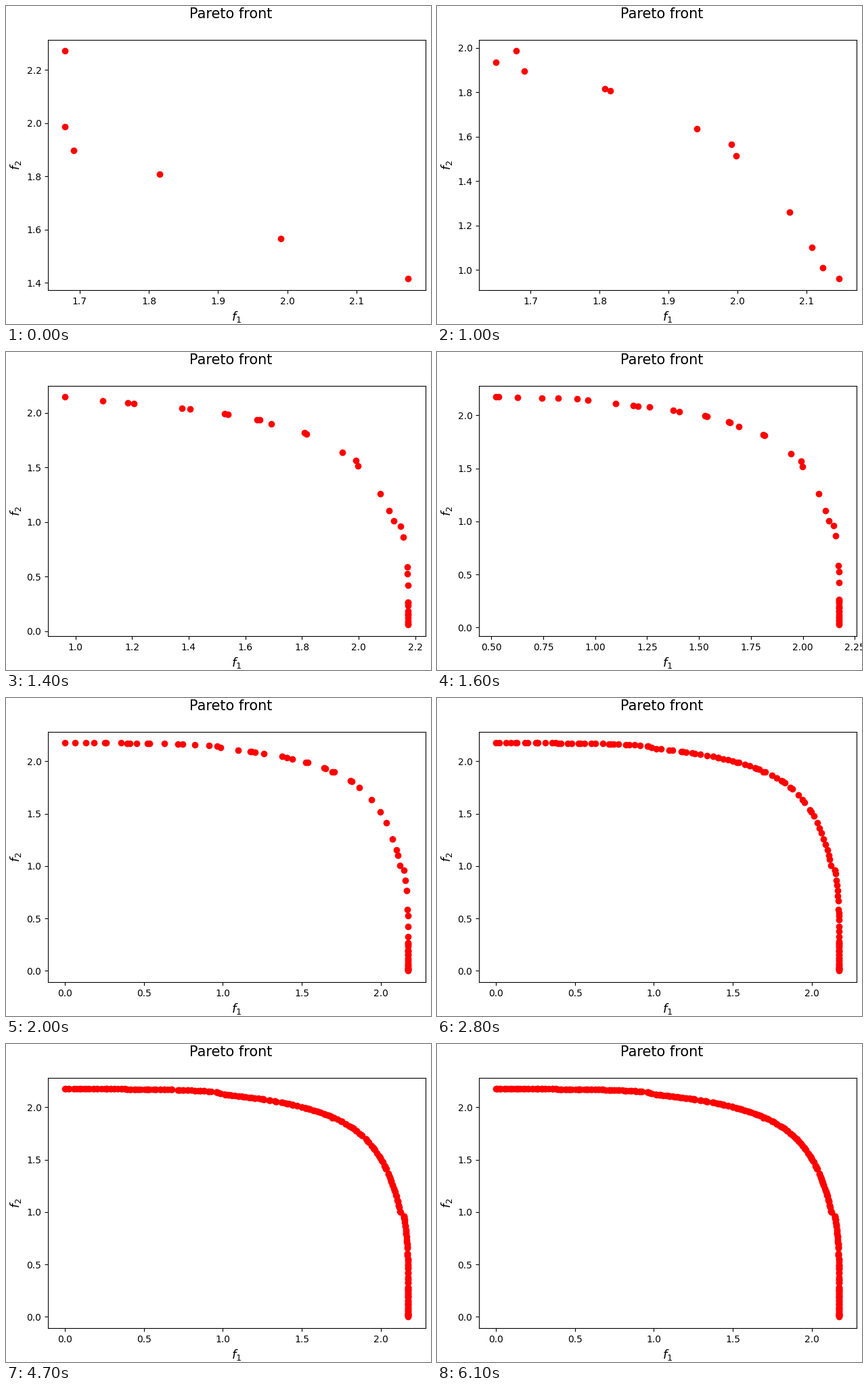
Recreate the animation shown at these times as a matplotlib script. Size 628x469 px, loop 6500 ms.

```python
import numpy as np
import matplotlib.pyplot as plt
from matplotlib.animation import FuncAnimation

W, H, DPI = 628, 469, 100
FRAMES, STEP = 65, 100
R = 2.1755
GOLDEN = (5 ** .5 - 1) / 2
rng = np.random.default_rng(4)

# Frames at which the archive of solutions grows, ever more rarely
CHANGES = [*range(10, 23), 24, 25, 27, 28, 30, 32, 34, 35, 38, 40, 44, 47,
           50, 53, 57, 61]


def front():
    """Symmetric superellipse whose exponent jumps near both ends."""
    t = np.pi / 4 * (1 - np.cos(np.pi * np.linspace(0, 1, 4001)))
    bend = np.sin(2 * t) ** 2
    keep = (bend < .178) | (bend > .279)
    t, bend = t[keep], bend[keep]
    power = np.where(bend < .23, 3.75, 3.15 + .64 * bend)
    return R * np.cos(t) ** (2 / power), R * np.sin(t) ** (2 / power)


CX, CY = front()
arc = np.r_[0, np.cumsum(np.hypot(np.diff(CX) * 1.5, np.diff(CY)))]
arc /= arc[-1]


def at_arc(u):
    return np.interp(u, arc, CX), np.interp(u, arc, CY)


def at_x(x):
    return x, np.interp(x, CX[::-1], CY[::-1])


def at_y(y):
    return np.interp(y, CY, CX), y


def reach(frame):
    """Smallest f1 and f2 found so far."""
    return (np.interp(frame, [10, 12, 16, 20], [1.65, 1.405, .523, 0]),
            np.interp(frame, [10, 12, 16, 20], [.96, .09, .026, 0]))


def goal(frame):
    return int(np.interp(frame, [10, 16, 20, 28, 47, 61],
                         [6, 20, 38, 90, 230, 290]))


# x, y, birth, death
points = [
    (1.679, 2.271, 0, 10),
    (1.679, 1.986, 0, 13),
    (1.691, 1.897, 0, FRAMES),
    (1.816, 1.808, 0, FRAMES),
    (1.991, 1.566, 0, 18),
    (2.175, 1.415, 0, 10),
]

# Both ends push outwards, with a cluster at the steep end
for f in range(10, 21):
    x_min, y_min = reach(f)
    points += [(*at_x(x_min), f, FRAMES), (*at_y(y_min), f, FRAMES)]
for k in range(10):
    points.append((*at_y(rng.uniform(.09, .27)), 12 + k % 5, FRAMES))

# The rest fills in evenly along the curve
order = np.arange(goal(FRAMES))
fx, fy = at_arc((order * GOLDEN + rng.uniform(-.004, .004, order.size)) % 1)
birth = np.full(order.size, FRAMES)
for f in CHANGES:
    x_min, y_min = reach(f)
    ready = np.flatnonzero((birth == FRAMES) & (fx >= x_min) & (fy >= y_min))
    missing = goal(f) - np.count_nonzero(birth < FRAMES)
    birth[ready[:missing]] = f
points += [(x, y, b, FRAMES) for x, y, b in zip(fx, fy, birth)]

X, Y, BORN, DIES = np.array(points).T

fig = plt.figure(figsize=(W / DPI, H / DPI), dpi=DPI)
left, right, top, bottom = 62.1, 619.8, 49.56, 419.2
ax = fig.add_axes([left / W, 1 - bottom / H, (right - left) / W, (bottom - top) / H])
fig.text(332 / W, 1 - 18 / H, "Pareto front", fontsize=15, ha="center", va="baseline")
ax.set_xlabel("$f_1$", fontsize=13)
ax.set_ylabel("$f_2$", fontsize=13)
dots, = ax.plot([], [], "ro")


def draw(i):
    live = (BORN <= i) & (i < DIES)
    dots.set_data(X[live], Y[live])
    ax.relim()
    ax.autoscale_view()
    return dots,


anim = FuncAnimation(fig, draw, frames=FRAMES, init_func=lambda: draw(0),
                     interval=STEP, repeat=True, repeat_delay=0, blit=False)
plt.show()
```
